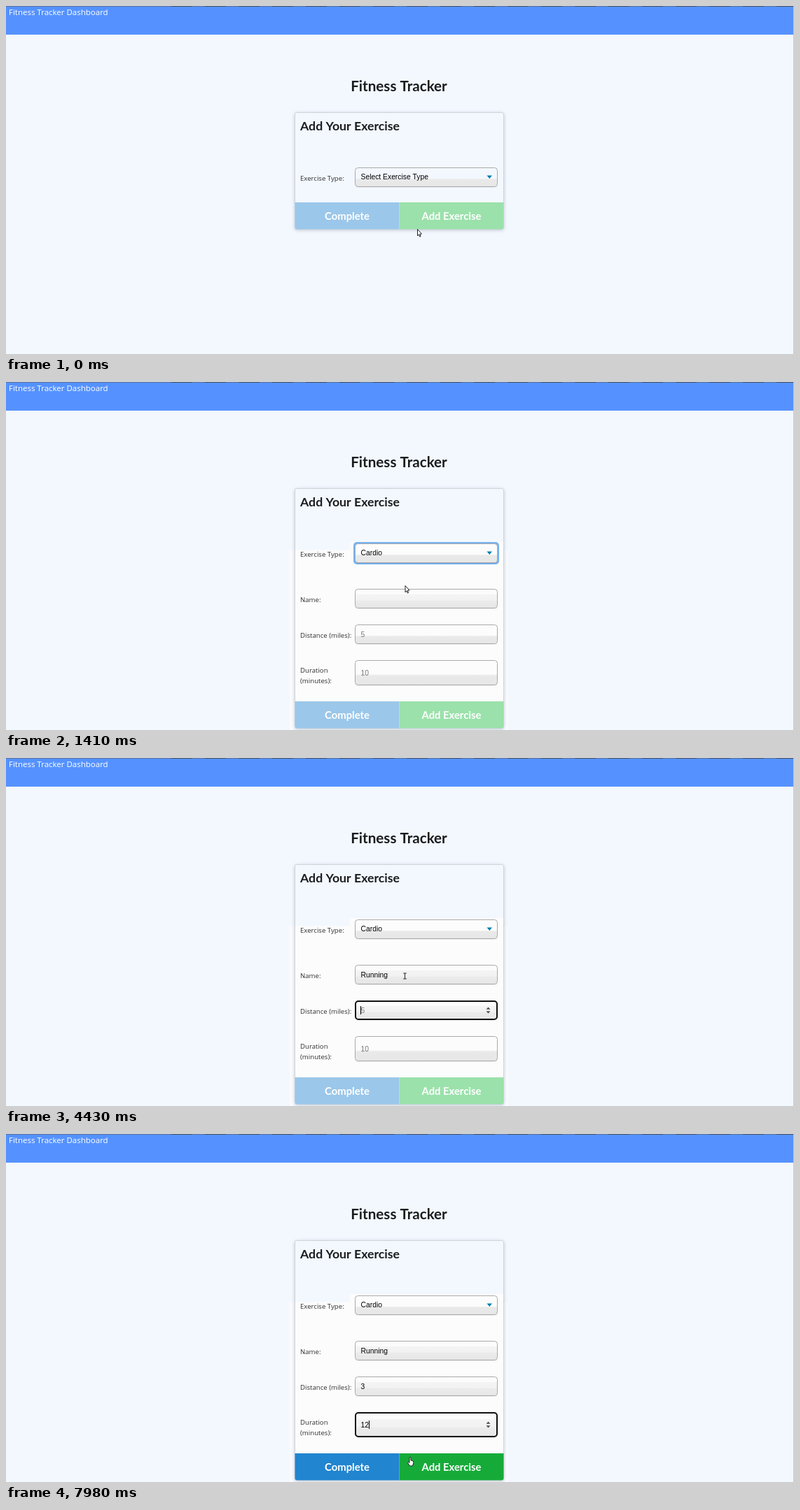
An HTML page with a canvas for the animation above (8000 ms loop, 1125 by 498 pixels).

```html
<!DOCTYPE html>
<html lang="en">
<head>
<meta charset="utf-8">
<title>Fitness Tracker</title>
<style>
  html, body { margin: 0; width: 100%; height: 100%; overflow: hidden; background: #f3f8ff; }
  canvas { display: block; }
</style>
</head>
<body>
<canvas id="stage" width="1125" height="498"></canvas>
<script>
const ctx = document.getElementById('stage').getContext('2d');
const LOOP = 8000;
const PAGE = '#f3f8ff', PAPER = '#fcfcfc', INK = '#222';
const LATO = 'Lato, sans-serif';
const HUMAN = '"Open Sans", "Noto Sans", sans-serif';
const ARIAL = '"Liberation Sans", Arial, sans-serif';
const NAME = { y: 296, h: 28 }, DISTANCE = { y: 347, h: 28 }, DURATION = { y: 398, h: 36 };

const clamp = v => Math.max(0, Math.min(1, v));
const lerp = (a, b, p) => a + (b - a) * p;
const ease = p => p * p * (3 - 2 * p);
const inside = (y, field) => y >= field.y && y < field.y + field.h;

// Progress that advances in n hard steps, the first at start and the last at end.
function stepped(t, start, end, n) {
  if (t < start) return 0;
  return clamp((Math.floor((t - start) / (end - start) * (n - 1) + 0.001) + 1) / n);
}

// What has been typed so far, given the time of each keystroke.
const typed = (t, word, times) => word.slice(0, times.filter(k => t >= k).length);

function rect(x, y, w, h, color) {
  ctx.fillStyle = color;
  ctx.fillRect(x, y, w, h);
}

function text(str, x, y, font, color = INK, align = 'left') {
  ctx.font = font;
  ctx.fillStyle = color;
  ctx.textAlign = align;
  ctx.fillText(str, x, y);
}

function roundRect(x, y, w, h, r) {
  ctx.beginPath();
  ctx.roundRect(x, y, w, h, r);
}

function polygon(points, fill, stroke) {
  ctx.beginPath();
  points.forEach(([x, y]) => ctx.lineTo(x, y));
  ctx.closePath();
  ctx.fillStyle = fill;
  ctx.fill();
  if (stroke) {
    ctx.strokeStyle = stroke;
    ctx.lineWidth = 1;
    ctx.stroke();
  }
}

function withShadow(color, blur, dx, dy, draw) {
  ctx.save();
  Object.assign(ctx, { shadowColor: color, shadowBlur: blur, shadowOffsetX: dx, shadowOffsetY: dy });
  draw();
  ctx.restore();
}

function drawPage() {
  rect(0, 0, 1125, 498, PAGE);
  rect(0, 0, 1125, 41, '#5592ff');
  rect(0, 0, 1125, 1, '#56709f');
  for (let x = 236; x < 1125; x += 48) rect(x, 0, 30, 1, '#4a4e57');
  rect(1124, 0, 1, 498, '#c3c9d3');
  text('Fitness Tracker Dashboard', 4, 13, `11.5px ${HUMAN}`, '#fff');
  text('Fitness Tracker', 561, 122, `bold 20.6px ${LATO}`, '#1b1c1d', 'center');
}

function drawButton(x, y, w, label, color, radii) {
  ctx.fillStyle = color;
  roundRect(x, y, w, 38.5, radii);
  ctx.fill();
  text(label, x + w / 2, y + 24.5, `bold 14.8px ${LATO}`, '#fff', 'center');
}

function mix(a, b, p) {
  return `rgb(${a.map((v, i) => Math.round(lerp(v, b[i], p))).join()})`;
}

function drawCard(open, active, hover) {
  const top = open ? 457 : 281;
  const bottom = top + 38.5;
  if (open) {
    rect(405, 240, 7, 258, '#f9fbfe');
    rect(711, 240, 6, 258, '#f9fbfe');
  }
  withShadow('rgba(110,120,135,.45)', 5, 0, 1, () => {
    ctx.fillStyle = PAGE;
    roundRect(412.5, 152.5, 298, bottom - 152.5, 3);
    ctx.fill();
  });
  ctx.strokeStyle = '#d0d4da';
  ctx.lineWidth = 1;
  ctx.stroke();
  if (open) {
    rect(413, 240, 78, 217, PAPER);
    rect(491, 229, 219, 228, PAPER);
  }
  text('Add Your Exercise', 420, 178, `bold 17.7px ${LATO}`, '#1b1c1d');
  drawButton(412.5, top, 149, 'Complete', mix([155, 199, 234], [33, 133, 208], active), [0, 0, 0, 3]);
  const green = hover ? '#16ab39' : mix([155, 225, 171], [33, 186, 69], active);
  drawButton(561.5, top, 149, 'Add Exercise', green, [0, 0, 3, 0]);
}

function drawLabels(open) {
  const label = (str, y) => text(str, 420, y, `9.65px ${HUMAN}`, '#303030');
  label('Exercise Type:', 249.5);
  if (!open) return;
  label('Name:', 314.5);
  label('Distance (miles):', 365.5);
  label('Duration', 416);
  label('(minutes):', 430.5);
}

function drawBox({ y, h }, focused, bands) {
  const fill = ctx.createLinearGradient(0, y, 0, y + h);
  bands.forEach(([stop, color]) => fill.addColorStop(stop, color));
  rect(500, y + h, 201, 1, 'rgba(0,0,0,.06)');
  ctx.fillStyle = fill;
  ctx.strokeStyle = focused ? '#101010' : '#aaa';
  ctx.lineWidth = focused ? 2 : 1;
  const inset = focused ? 1 : 0.5;
  roundRect(498 + inset, y + inset, 204 - 2 * inset, h - 2 * inset, 4);
  ctx.fill();
  ctx.stroke();
}

const twoTone = light => [[0, light], [.55, light], [.62, '#e9e9e9'], [1, '#e7e7e7']];
const shaded = [[0, PAPER], [.26, PAPER], [.3, '#f4f4f4'], [.58, '#f2f2f2'], [.62, '#ebebeb'], [1, '#e6e6e6']];

function drawSelect(value, focused, open) {
  if (focused) {
    ctx.fillStyle = '#76b2f0';
    roundRect(496, 229, 208, 32, 5);
    ctx.fill();
  }
  drawBox({ y: 231, h: 28 }, false, twoTone(open || focused ? PAPER : PAGE));
  text(value, 506.5, 248, `10.33px ${ARIAL}`, '#000');
  polygon([[686.5, 242.5], [694, 242.5], [690.25, 247]], '#007cb2');
}

function drawOptions(highlight) {
  withShadow('rgba(0,0,0,.4)', 4, 2, 2, () => rect(499, 259, 202.5, 41, '#fff'));
  ctx.strokeStyle = '#767676';
  ctx.lineWidth = 1;
  ctx.strokeRect(499.5, 259.5, 202, 40);
  ['Select Exercise Type', 'Resistance', 'Cardio'].forEach((option, i) => {
    const chosen = highlight === i;
    const y = 260 + i * 13.2;
    if (chosen) rect(500, Math.round(y), 201, 13, i ? '#1e90ff' : '#c8c8c8');
    const color = chosen ? '#fff' : i ? '#111' : '#6d6d6d';
    text(option, 507, y + 9.3, `10.6px ${ARIAL}`, color);
  });
}

function drawSpinner({ y, h }) {
  const mid = y + h / 2;
  polygon([[685.5, mid - 1.3], [691.5, mid - 1.3], [688.5, mid - 4.5]], '#4c4c4c');
  polygon([[685.5, mid + 1.3], [691.5, mid + 1.3], [688.5, mid + 4.5]], '#4c4c4c');
}

function drawInput(field, value, { hint = '', focused = false, caret = false, spinner = false }) {
  const plain = hint && !value && !focused;
  drawBox(field, focused, plain ? twoTone(PAPER) : shaded);
  const base = field.y + field.h / 2 + 4;
  const font = `10.33px ${ARIAL}`;
  text(value || hint, 506.5, base, font, value ? '#000' : '#777');
  if (caret) {
    ctx.font = font;
    rect(Math.round(506.3 + ctx.measureText(value).width), base - 10, 1, 12, '#000');
  }
  if (spinner) drawSpinner(field);
}

function drawSuggestion(alpha) {
  if (alpha <= 0) return;
  ctx.save();
  ctx.globalAlpha = alpha;
  withShadow('rgba(0,0,0,.35)', 3, 0, 1, () => rect(499, 325, 203, 38.5, '#fff'));
  text('Running', 508, 347.5, `600 9.2px ${HUMAN}`, '#111');
  ctx.restore();
}

function drawArrow(x, y) {
  const shape = [[0, 0], [0, 10], [2.3, 7.8], [3.9, 11.3], [5.4, 10.6], [3.9, 7.2], [7, 7]];
  polygon(shape.map(([dx, dy]) => [x + .5 + dx * .85, y + .5 + dy * .95]), '#fff', '#222');
}

function drawBeam(x, y) {
  rect(x - .5, y - 4.5, 1, 9, '#222');
  for (const end of [-4.5, 3.5]) {
    rect(x - 2.5, y + end, 2, 1, '#444');
    rect(x + .5, y + end, 2, 1, '#444');
  }
}

function drawHand(x, y) {
  ctx.beginPath();
  ctx.moveTo(x - 1, y + 7);
  ctx.lineTo(x - 1, y);
  ctx.quadraticCurveTo(x, y - 1.5, x + 1, y);
  ctx.lineTo(x + 1, y + 4);
  ctx.lineTo(x + 4.5, y + 5);
  ctx.quadraticCurveTo(x + 5.5, y + 7, x + 4, y + 10);
  ctx.lineTo(x + 3.5, y + 12);
  ctx.lineTo(x - .5, y + 12);
  ctx.lineTo(x - 3.5, y + 7.5);
  ctx.quadraticCurveTo(x - 3, y + 5.5, x - 1, y + 7.5);
  ctx.closePath();
  ctx.fillStyle = '#fff';
  ctx.fill();
  ctx.strokeStyle = '#222';
  ctx.lineWidth = 1;
  ctx.stroke();
}

function pointerAt(t) {
  const legs = [
    { from: [587, 319], to: [583, 237], start: 60, end: 380, n: 6 },
    { from: [583, 237], to: [569.5, 288.5], start: 560, end: 1010, n: 9 },
    { from: [569.5, 288.5], to: [569.5, 312], start: 1360, end: 1610, n: 5 },
    { from: [569.5, 312], to: [577, 463], start: 7360, end: 7980, n: 14 },
  ];
  const leg = legs.filter(l => t >= l.start).pop() || legs[0];
  const p = ease(stepped(t, leg.start, leg.end, leg.n));
  return [lerp(leg.from[0], leg.to[0], p), lerp(leg.from[1], leg.to[1], p)];
}

function drawPointer(x, y, open) {
  if (open && y >= 457) drawHand(x, y);
  else if (open && [NAME, DISTANCE, DURATION].some(f => inside(y, f))) drawBeam(x, y);
  else drawArrow(x, y);
}

function between(t, ...spans) {
  return spans.some(([a, b]) => t >= a && t < b);
}

function draw(t) {
  const open = t >= 1290;
  const [px, py] = pointerAt(t);
  const active = t < 6320 ? 0 : clamp(.4 + (t - 6320) / 110);
  ctx.clearRect(0, 0, 1125, 498);
  drawPage();
  drawCard(open, active, open && py >= 457);
  drawLabels(open);
  drawSelect(open ? 'Cardio' : 'Select Exercise Type', between(t, [310, 1680]), open);

  if (between(t, [380, 1290])) {
    drawOptions(py >= 286 ? 2 : py >= 273 ? 1 : 0);
  }
  if (open) {
    drawInput(NAME, typed(t, 'Running', [2120, 2460, 2700, 2820, 2970, 3040, 3130]), {
      focused: between(t, [1680, 3410]),
      caret: between(t, [1680, 3410]),
    });
    const onDistance = between(t, [3410, 5980]);
    drawInput(DISTANCE, typed(t, '3', [5740]), {
      hint: '5',
      focused: onDistance,
      caret: between(t, [3410, 3930], [4430, 4990], [5490, 5980]),
      spinner: onDistance || inside(py, DISTANCE),
    });
    drawInput(DURATION, typed(t, '12', [6320, 6550]), {
      hint: '10',
      focused: t >= 5980,
      caret: between(t, [5980, 7080], [7580, LOOP]),
      spinner: t >= 5980,
    });
    if (t >= 2120) drawSuggestion(1 - stepped(t, 3180, 3340, 4));
  }
  drawPointer(px, py, open);
}

function frame(now) {
  draw(now % LOOP);
  requestAnimationFrame(frame);
}
requestAnimationFrame(frame);
</script>
</body>
</html>
```
